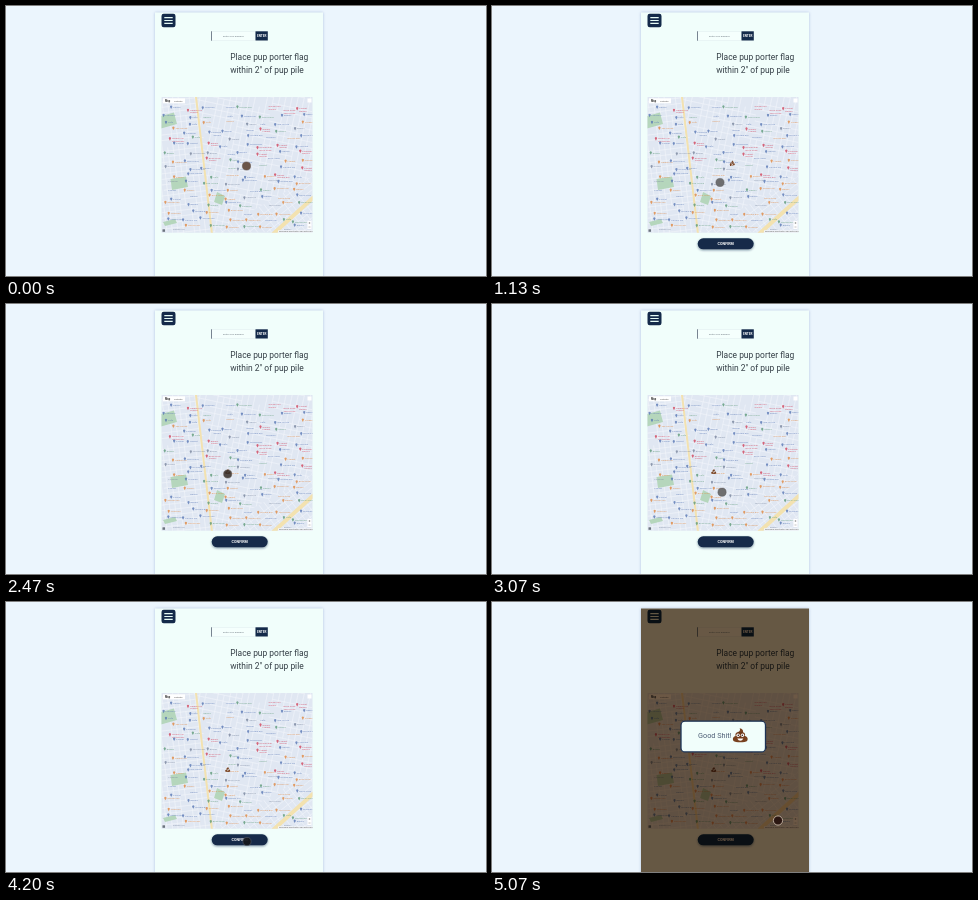
Animation, 480 px wide and 270 px high, one loop 5140 ms. Source, as an HTML page:

```html
<!DOCTYPE html>
<html lang="en">
<head>
<meta charset="utf-8">
<title>Place the flag</title>
<style>
html, body { margin: 0; width: 100%; height: 100%; overflow: hidden; background: #ebf5fd; }
svg { display: block; width: 480px; height: 270px; font-family: Roboto, sans-serif; }
.shade { mix-blend-mode: multiply; }
</style>
</head>
<body>
<svg viewBox="0 0 480 270">
  <defs>
    <clipPath id="mapClip"><rect x="155.5" y="91" width="151" height="135.7"/></clipPath>
    <clipPath id="west"><path d="M155 91H190L206 228H155Z"/></clipPath>
    <clipPath id="east"><path d="M190 91H307V170L206 228Z"/></clipPath>
    <clipPath id="south"><path d="M307 170V228H206Z"/></clipPath>
    <filter id="soft" x="-20%" y="-20%" width="140%" height="160%">
      <feDropShadow dx="0" dy="1" stdDeviation="1" flood-color="#142a4a" flood-opacity=".5"/>
    </filter>
    <filter id="edge"><feDropShadow dx="0" dy="0" stdDeviation="1.5" flood-color="#9fb2d8" flood-opacity=".8"/></filter>
    <g id="pile">
      <path d="M-.6-7C2-6.6 3.3-4.9 2.7-3C4.6-2.5 5.3-.6 4.6 .9C7.2 1.2 8.1 4 6.8 5.7C5.2 7.6-5.2 7.6-6.8 5.7C-8.1 4-7.2 1.2-4.6 .9C-5.5-.8-4.6-2.6-2.9-3C-1-3.5 .4-4.7-.6-7Z" fill="#78411f"/>
      <path d="M-4.2 1Q0 2.3 4.3 1M-2.6-2.9Q0-2 2.4-2.9" fill="none" stroke="#5d2f16" stroke-width=".6"/>
      <g fill="#fff"><circle cx="-2.2" r="1.7"/><circle cx="2.2" r="1.7"/><path d="M-3 3.2H3Q2 5.5 0 5.5T-3 3.2Z"/></g>
      <g fill="#2b1a14"><circle cx="-2" r=".8"/><circle cx="2" r=".8"/></g>
    </g>
  </defs>

  <rect x="149" y="6.5" width="168" height="270" fill="#f1fefb" filter="url(#edge)"/>
  <rect x="155.5" y="7.7" width="14" height="13.5" rx="2.2" fill="#142a4a"/>
  <path d="M158.3 11.6h8.4m0 2.9h-8.4m0 2.9h8.4" fill="none" stroke="#e6fbf6" stroke-width="1.1"/>

  <rect x="205.5" y="25.5" width="44" height="9" fill="#f5fffd" stroke="#dbe6e8" stroke-width=".4"/>
  <path d="M205.5 25.3v9.4" stroke="#5b6878" stroke-width=".8"/>
  <text x="217" y="31" font-size="2.5" fill="#66717b">Enter your address</text>
  <rect x="249.5" y="25.3" width="12.3" height="9.2" fill="#142a4a"/>
  <text x="255.7" y="31" font-size="3.1" font-weight="700" fill="#fff" text-anchor="middle">ENTER</text>

  <g font-size="8.45" fill="#333d45">
    <text x="224.2" y="54">Place pup porter flag</text>
    <text x="224.2" y="67">within 2" of pup pile</text>
  </g>

  <g clip-path="url(#mapClip)">
    <rect x="155" y="91" width="152" height="136" fill="#e0e7f2"/>
    <g id="streets" fill="none" stroke="#f2f5fb" stroke-width=".6"></g>
    <g fill="#b5d6bc">
      <path d="M155 110L168 106.5L171 118L155 122.5Z"/>
      <path d="M164.5 173L180 170.5L182 181L166 184Z"/>
      <path d="M211 186l8 4l-3 9l-8-3Z"/>
      <path d="M157 216l12-3l2 4l-12 3Z"/>
    </g>
    <g fill="none" stroke="#f3e2b0">
      <path d="M190 91L206 228" stroke-width="2"/>
      <path d="M266 229L308 191" stroke-width="4"/>
    </g>
    <g id="pins" font-size="2.5" opacity=".8"></g>
    <rect x="157" y="92.3" width="22" height="5" fill="#fff"/>
    <text x="159" y="95.8" font-size="2.6" font-weight="700" fill="#333">Map</text>
    <text x="168" y="95.8" font-size="2.4" fill="#555">Satellite</text>
    <path d="M301.5 92.5h4v4h-4ZM301.5 215h4v8h-4Z" fill="#fff"/>
    <path d="M302.5 217h2m-1-1v2m-1 3h2" fill="none" stroke="#666" stroke-width=".4"/>
    <rect x="156.5" y="223.3" width="2.5" height="2.5" fill="#6b747e"/>
    <rect x="272" y="224.3" width="35" height="2.5" fill="#f3f6f9"/>
    <text x="273" y="226.3" font-size="2.2" fill="#555">Keyboard shortcuts   Map data   Terms</text>
  </g>

  <g id="confirm">
    <rect x="205.7" y="232.3" width="56" height="11" rx="5.5" fill="#142a4a" filter="url(#soft)"/>
    <text x="233.7" y="239.2" font-size="3.7" font-weight="700" fill="#fff" text-anchor="middle">CONFIRM</text>
  </g>
  <use id="flag" href="#pile"/>
  <rect id="shade" class="shade" x="149" y="6.5" width="168" height="264" fill="#6c5845"/>
  <g id="modal">
    <rect x="189" y="119.2" width="84.5" height="30.7" rx="4" fill="#f1fefb" stroke="#1d3355" stroke-width="1.3"/>
    <text x="206" y="136.4" font-size="7.3" fill="#4c5d75">Good Shit!</text>
    <use href="#pile" transform="translate(248.3 133.2)"/>
  </g>
  <circle id="cursor"/>
</svg>
<script>
const LOOP = 5140, CLICK = 130, MOVE = 2130, PRESS = 4130, OPEN = 4400;
const $ = id => document.getElementById(id);

function add(parent, tag, attrs, text = '') {
  const el = document.createElementNS('http://www.w3.org/2000/svg', tag);
  for (const k in attrs) el.setAttribute(k, attrs[k]);
  el.textContent = text;
  parent.append(el);
  return el;
}

let seed = 11;
const rnd = () => (seed = seed * 16807 % 2147483647) / 2147483647;
const pick = list => list[rnd() * list.length | 0];

// A tilted grid of broken streets inside one district
function district(clip, x, y, angle, gap) {
  let d = '';
  for (let i = -110; i <= 110; i += gap) {
    for (let j = -110; j < 110; j += 30) {
      if (rnd() < .8) d += `M${x + i} ${y + j}v30`;
      if (rnd() < .8) d += `M${x + j} ${y + i}h30`;
    }
  }
  const g = add($('streets'), 'g', { 'clip-path': `url(#${clip})` });
  add(g, 'path', { d, transform: `rotate(${angle} ${x} ${y})` });
}
district('west', 175, 160, -7, 5.5);
district('east', 245, 150, 12, 6);
district('south', 270, 205, -38, 5.5);

const words = ['Cafe', 'Bakery', 'Market', 'Garden Inn', 'Book Shop', 'Noodle Bar', 'Gallery', 'Barber', 'Tea House', 'Museum'];
const red = '#d2445c', orange = '#e0873f', blue = '#5877b4', grey = '#78859d', green = '#5d9a78';

// Scattered places: red to the north, orange to the south
for (let row = 0; row < 17; row++) {
  for (let col = 0; col < 8; col++) {
    const x = 157 + col * 18.5 + rnd() * 12, y = 100 + row * 7.4 + rnd() * 5;
    const fill = pick([row < 10 ? red : orange, orange, blue, blue, grey, green]);
    if (rnd() < .75) add($('pins'), 'path', { d: `M${x} ${y + 1.8}l-1-1.8a1.15 1.15 0 1 1 2 0Z`, fill });
    add($('pins'), 'text', { x: x + 2, y: y + .6, fill }, pick(words));
    if (fill === red) add($('pins'), 'text', { x: x + 2, y: y + 3, fill }, pick(words));
  }
}

// start, end, x, y
const moves = [
  [640, 1130, 228, 176.5], [1150, 1400, 221.7, 170],
  [2800, 3530, 248.5, 228.5], [3530, 3870, 241, 239.5], [4860, 5070, 286, 218.5]
];
function place(t) {
  let x = 240.5, y = 160;
  for (const [from, to, toX, toY] of moves) {
    const k = Math.min(1, Math.max(0, (t - from) / (to - from))), e = k * k * (3 - 2 * k);
    x += (toX - x) * e;
    y += (toY - y) * e;
  }
  return [x, y];
}

// fill, stroke, stroke width, fill opacity
function cursorStyle(t) {
  if (t >= OPEN) return ['#2b1712', '#c6b5a5', .9, t < 4860 ? .35 : 1];
  if (t >= PRESS) return ['#15171c', '#565c66', .6, .95];
  if (t < CLICK) return ['#6b5548', '#5a483f', .5, 1];
  if (t >= MOVE && t < 2600) return ['#352c27', '#5b5049', .5, .85];
  return ['#646465', '#58595b', .5, .93];
}

function show(id, on) { $(id).style.display = on ? '' : 'none'; }

function draw(now) {
  const t = now % LOOP, [cx, cy] = place(t);
  const [fill, stroke, strokeWidth, fillOpacity] = cursorStyle(t);
  const cursor = $('cursor');
  Object.assign(cursor.style, { fill, stroke, strokeWidth, fillOpacity });
  cursor.setAttribute('cx', cx);
  cursor.setAttribute('cy', cy);
  cursor.setAttribute('r', t >= OPEN ? 4.6 : 4.1);
  const spot = t < MOVE ? '240.3 157' : '221.7 167.5';
  $('flag').setAttribute('transform', `translate(${spot}) scale(.34)`);
  show('flag', t >= CLICK);
  show('confirm', t >= CLICK);
  show('shade', t >= OPEN);
  show('modal', t >= OPEN);
  requestAnimationFrame(draw);
}
requestAnimationFrame(draw);
</script>
</body>
</html>
```
